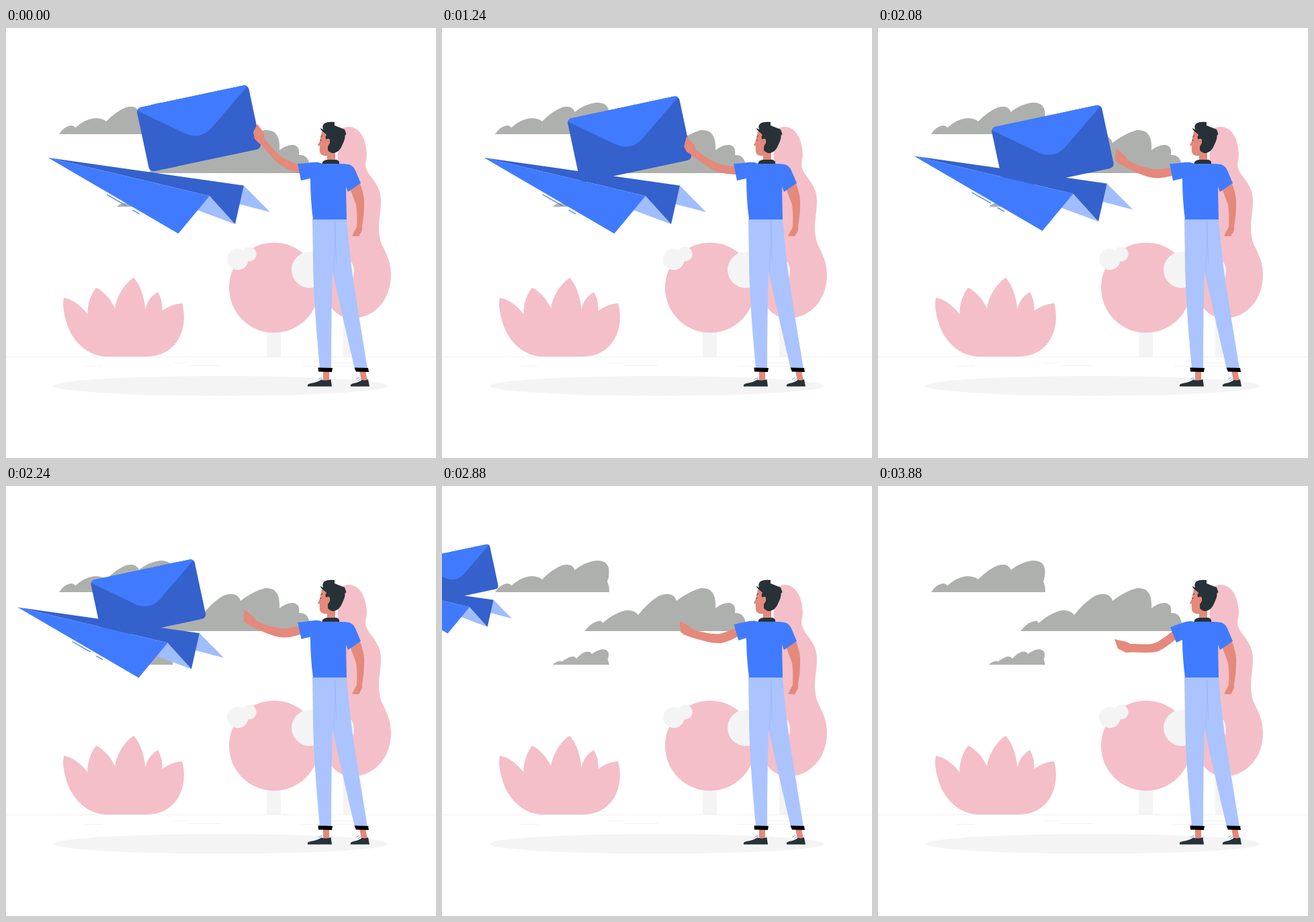
These frames come from a looping animation (640x640 px, 4.92 s). An HTML page:

```html
<!DOCTYPE html>
<html lang="en">
<head>
<meta charset="utf-8">
<title>Sending a letter</title>
<style>
  html, body { margin: 0; width: 100%; height: 100%; overflow: hidden; background: #fff; }
  svg { display: block; width: 100vw; height: 100vh; }
  .blue { fill: #407bff; }
  .navy { fill: #3461cc; }
  .pale { fill: #a0bdff; }
  .pants { fill: #abc4ff; }
  .pink { fill: #f4bfc8; }
  .mist { fill: #f4f4f4; }
  .cloud { fill: #aeb0ae; }
  .skin { fill: #e4897b; }
  .dark { fill: #263238; }
  .line { fill: none; stroke: #f2f2f2; }
</style>
</head>
<body>
<svg viewBox="0 0 640 640">
  <!-- ground -->
  <path class="line" d="M0 489.5H640M117 503.5H143M248 498.5H271M271 502.5H321M440 503.5H520M485 498.5H517"/>
  <ellipse class="mist" cx="320" cy="532.7" rx="248.5" ry="14.7"/>

  <g class="cloud">
    <path d="M79 158Q87 146 97 145Q102 145.500 103 148.500Q117 136 130 134.500Q142 133.500 149 139Q165 123 179 118Q194 114 197.500 125Q213 113 229 111Q247 110 248.500 125Q249 136 246 142Q249 148 249 158Z"/>
    <path d="M212 216Q224 201 236 200.500Q238 201 239 204Q254 191 268 186.500Q284 182 292 192Q306 174 322 164Q344 155 349 171Q367 157 385 152Q409 150 407 182Q418 173 428 174Q438 176 436 189Q446 188 450 197Q452 201 452 207V216Z"/>
    <path d="M165 266Q171 260 177 260.500L178 261.500Q186 256 192 254Q198 253 200 257Q206 250 213 247Q221 245 223 250Q231 244 239 243Q248 243 248 251Q248 256 246.500 258Q248.500 262 248.500 266Z"/>
  </g>

  <!-- plants -->
  <path class="pink" d="M148 489C120 488 98 464 91 441C85 422 84 412 86 401.500C100 404 111 413 121.500 426C121 411 126 397 134 386.500C146 392 156 404 162 417C165 400 174 383 190 371.500C200 383 206 400 207.500 419C210 407 216 399 226 393C231 402 233 410 232.500 421C241 415 250 411 262 409.500C268 430 265 453 252 470C240 484 225 489 209 489Z"/>
  <path class="mist" d="M388 450H409V489H388ZM502 430H513V489H502Z"/>
  <circle class="pink" cx="399" cy="386.500" r="67"/>
  <path class="pink" d="M511 147C528 148 537 168 537 190C536 198 534 203 536 209C541 224 559 232 558 260C558 275 552 295 557 315C560 328 573 342 573 367C573 405 548 432 515 432C485 432 470 400 470 365C470 330 490 320 490 290L495 155C499 149 505 147 511 147Z"/>
  <g class="mist">
    <circle cx="345" cy="344.500" r="15.700"/>
    <circle cx="362" cy="336.500" r="10.700"/>
    <circle cx="452" cy="360" r="27"/>
    <ellipse cx="511" cy="362" rx="7" ry="15"/>
  </g>

  <!-- letter and paper plane -->
  <g id="flight">
    <g id="letter">
      <rect class="navy" x="-85" y="-48.700" width="170" height="97.400" rx="7"/>
      <path class="blue" d="M-83.500 -44Q-83 -48.700 -78 -48.700H78Q82 -48.700 82.500 -45.500L19 3Q-1 18 -22 3Z"/>
    </g>
    <path class="pale" d="M354 234.500L393 274L347 262ZM303 250L341 292L285 271Z"/>
    <path class="navy" d="M62.500 193L354 234.500L341 292L303 250Z"/>
    <path class="blue" d="M62.500 193L303 250L256.500 306Z"/>
    <path d="M150 248L179 264.500M188.500 271L199 277" fill="none" stroke="#407bff" stroke-width="1.300"/>
  </g>

  <!-- legs -->
  <path class="skin" d="M472 510H481V525H472ZM526 510H535L538 525H529Z"/>
  <path class="dark" d="M449 533Q448 530 453 529Q464 527 469 523.500Q477 525.500 483.500 523L485 533.500H449ZM513 533Q512 530 517 529Q526 527 530 523.500Q534 525.500 539 523L541 533.500H513Z"/>
  <path d="M465 523L470 520M467 525L471 522M521 523L526 520M524 525L528 522" fill="none" stroke="#407bff" stroke-width=".7"/>
  <path class="pants" d="M484 284H507Q512 345 518 384L538 507H519Q503 440 486 362Z"/>
  <path class="pants" d="M456 284H490L491 345L486 362Q484 430 484 507H467Q457 400 457 345Z"/>
  <path d="M488.500 287Q491 320 487 362M490 290L491.500 350" fill="none" stroke="#94b3fb" stroke-width=".7"/>
  <path d="M464.500 505.500L486 506L485 512L465 511.500ZM518.500 505.500L539 506L540 512L521 511.500Z"/>

  <!-- upper body -->
  <path class="skin" d="M527 232Q534 250 533 263Q533 280 530 294V301L525 310L515 309.500L522 296Q523 275 521 263L512 239Z"/>
  <path id="arm" class="skin"/>
  <path id="shirt" class="blue"/>
  <path class="skin" d="M470 154L467.500 166Q467 170 464 173.500Q464 175 467 176Q466 183 468 187Q472 191 478 190V197H490V184L484 158Z"/>
  <path class="dark" d="M470.500 202Q470.500 197 478 196H492Q497 198 496 202Z"/>
  <path class="dark" d="M467.500 149Q470 154 474 156L477 159Q474 163 477 166Q483 163 482 171Q480 175 479 176V182Q483 187 489 186Q497 184 501 173Q505 165 504.500 160L506.500 158L504 151Q499 149 494 147L489 145V140Q479 139 474 142Q470 145 472 151Z"/>
  <path class="skin" d="M478 174Q474 168 478 165Q483 164 482 170Q481 174 478 174Z"/>
  <path d="M468.500 162L471 160M468.700 166V168" fill="none" stroke="#263238"/>
</svg>
<script>
  const LOOP = 4920, STEP = 40;
  const LETTER = { x: 287, y: 149.3, dx: -15, dy: 31 };
  const FLIGHT = { x: -8.143, y: 0.258, shrink: 0.0143, gone: 29 };

  const ARM_UP = 'M450 205C436 205 424 200 412 193C400 184 391 172 384.5 164L384 156L374 143L368 155L370 165L376 171L383 177C392 187 400 199 412 206C422 212 432 216 450 219Z';
  const ARM_OUT = 'M450 205C436 208 420 211 410 209.5C396 207 382 203 372 196L368 190L355 178L353 196L359 201.5L364 203L371 208C384 214 400 223 416 223C426 223 436 220 450 217Z';
  const ARM_LOW = 'M455 203C440 214 426 227 414 233C405 237 392 235 376 235L370 232L352 228L357 242L361 244L369 248L376 247.500C388 247 400 249 414 247C426 243 436 233 452 222Z';

  const BODY = 'C497 202 504 202 510 203Q517 205 520 212L528 231L509 244L506 236L507 285L457 285Q453 255 453 ';
  const SHIRT_OUT = 'M434 202C447 202 455 199 465 200L471 202L496 202' + BODY + '224L439 227Z';
  const SHIRT_LOW = 'M435 210C447 206 455 202 465 201L471 202L496 202' + BODY + '229L444 233Z';

  const byId = id => document.getElementById(id);
  const letter = byId('letter'), flight = byId('flight'), arm = byId('arm'), shirt = byId('shirt');
  const clamp = v => Math.min(1, Math.max(0, v));

  // Blend two paths that share the same commands.
  function blend(a, b, u) {
    const num = /-?[\d.]+/g, ends = b.match(num);
    let i = 0;
    return a.replace(num, v => +v + (ends[i++] - v) * u);
  }

  function draw(ms) {
    const t = Math.floor((ms % LOOP + 0.5) / STEP) * STEP;
    const drop = clamp((t - 840) / 760);
    const lower = clamp((t - 2040) / 1840);
    const n = Math.max(0, (t - 2040) / STEP);

    letter.setAttribute('transform',
      `translate(${LETTER.x + LETTER.dx * drop} ${LETTER.y + LETTER.dy * drop}) rotate(-12)`);
    flight.setAttribute('transform',
      `translate(${FLIGHT.x * n} ${FLIGHT.y * n}) scale(${Math.max(0, 1 - FLIGHT.shrink * n)})`);
    flight.setAttribute('visibility', n < FLIGHT.gone ? 'visible' : 'hidden');

    arm.setAttribute('d', lower > 0 ? blend(ARM_OUT, ARM_LOW, lower) : blend(ARM_UP, ARM_OUT, drop));
    shirt.setAttribute('d', blend(SHIRT_OUT, SHIRT_LOW, lower));
  }

  const start = performance.now();
  function tick() {
    draw(performance.now() - start);
    requestAnimationFrame(tick);
  }
  draw(0);
  requestAnimationFrame(tick);
</script>
</body>
</html>
```
